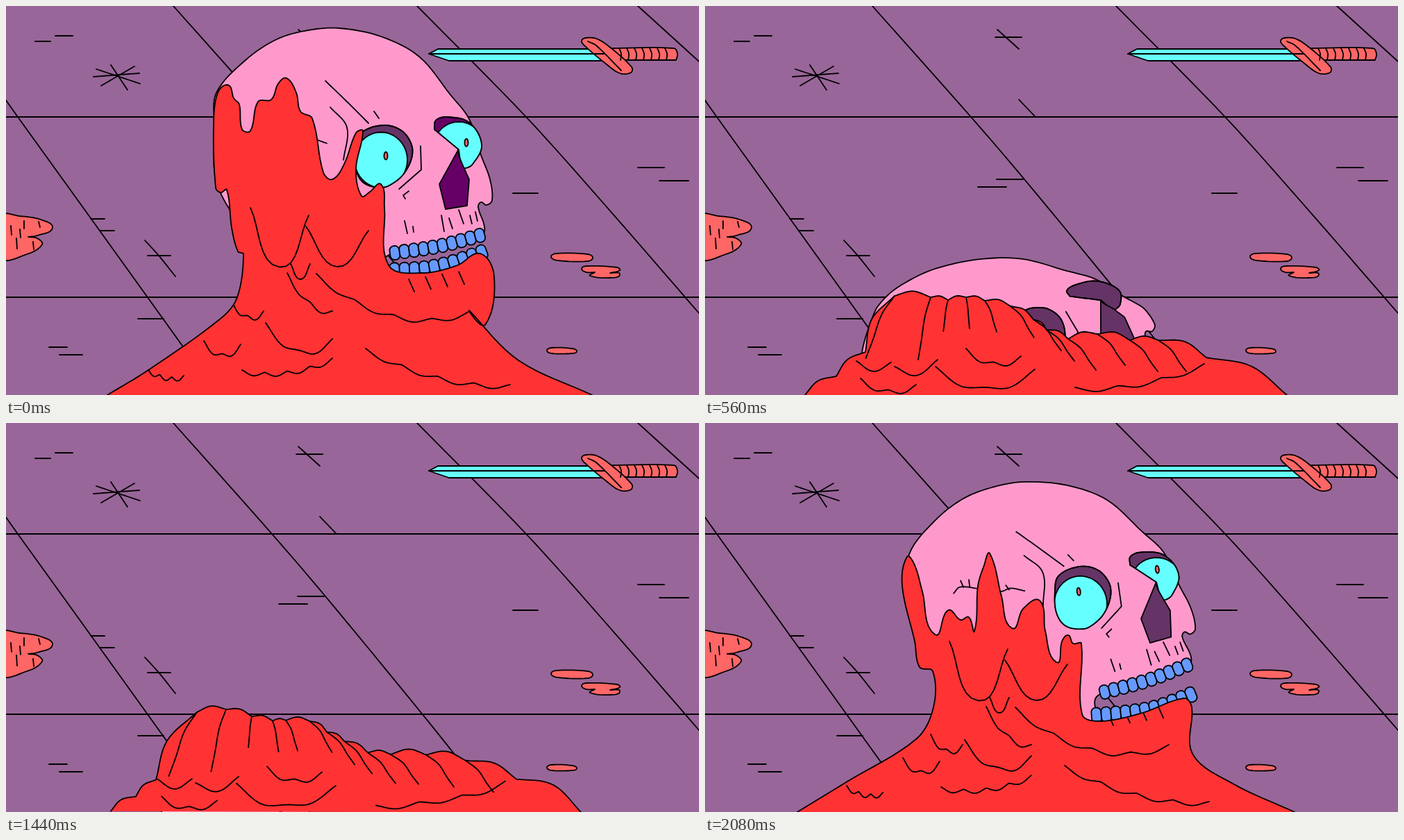
An HTML page with a canvas for the animation above (2.16 s loop, 998x561 px).

```html
<!DOCTYPE html>
<html lang="en">
<head>
<meta charset="utf-8">
<title>Melting skull</title>
<style>
html, body { margin: 0; width: 100%; height: 100%; overflow: hidden; background: #969 }
canvas { display: block; width: 100vw; height: 100vh }
</style>
</head>
<body>
<canvas id="stage" width="998" height="561"></canvas>
<script>
const ctx = document.getElementById('stage').getContext('2d');
const PINK = '#f9c', RED = '#f33', SALMON = '#f66', CYAN = '#6ff', BLUE = '#69f';
const STEP = 80, FRAMES = 27;
const dist = (a, b) => Math.hypot(a[0] - b[0], a[1] - b[1]);
const lerp = (a, b, t) => a.map((v, i) => v + (b[i] - v) * t);
const clamp = (v, lo, hi) => Math.max(lo, Math.min(hi, v));

// "x,y x,y*" becomes points; a star doubles a point to mark a sharp corner.
const points = text => text.trim().split(/\s+/).flatMap(s => {
  const q = s.split(',').map(parseFloat);
  return s.endsWith('*') ? [q, q] : [q];
});

function smooth(p, closed) {
  if (typeof p === 'string') p = points(p);
  const n = p.length, out = [];
  const at = i => closed ? p[(i + n) % n] : p[clamp(i, 0, n - 1)];
  for (let i = 0; i < (closed ? n : n - 1); i++) {
    const [a, b, c, d] = [-1, 0, 1, 2].map(k => at(i + k)), len = dist(b, c);
    if (!len) continue;
    const u = len / (dist(a, c) || 1), v = len / (dist(b, d) || 1);
    for (let k = 0; k < 8; k++) {
      const t = k / 8, w = 1 - t;
      out.push([0, 1].map(j => w * w * (1 + 2 * t) * b[j] + t * t * (3 - 2 * t) * c[j]
        + t * w * w * u * (c[j] - a[j]) - t * t * w * v * (d[j] - b[j])));
    }
  }
  out.push(at(closed ? 0 : n - 1));
  return out;
}
const loop = text => smooth(text, true);
const lines = text => text.split('|').map(s => smooth(s));
const oval = (x, y, rx, ry) => Array.from({ length: 41 }, (_, i) =>
  [x + rx * Math.cos(i * Math.PI / 20), y + ry * Math.sin(i * Math.PI / 20)]);

function resample(pts, n) {
  const sum = [0];
  for (let i = 1; i < pts.length; i++) sum.push(sum[i - 1] + dist(pts[i - 1], pts[i]));
  let j = 1;
  return Array.from({ length: n }, (_, i) => {
    const s = sum.at(-1) * i / (n - 1);
    while (j < pts.length - 1 && sum[j] < s) j++;
    return lerp(pts[j - 1], pts[j], Math.min(1, (s - sum[j - 1]) / (sum[j] - sum[j - 1] || 1)));
  });
}
function mix(a, b, t) {
  if (!t || a === b) return a;
  const q = resample(b, 240);
  return resample(a, 240).map((p, i) => lerp(p, q[i], t));
}

function trace(pts) {
  ctx.beginPath();
  pts.forEach(p => ctx.lineTo(p[0], p[1]));
}
function shape(pts, fill) {
  trace(pts);
  if (fill) { ctx.fillStyle = fill; ctx.fill(); }
  ctx.stroke();
}
function inside(pts, draw) {
  ctx.save(); trace(pts); ctx.clip(); draw(); ctx.restore();
}

// Floor
const floorLines = lines('0,136 17,160 122,306 254,490|241,0 383,160 460,250 598,418 670,508|592,0 749,160 860,284 998,443'
  + '|910,0 998,80|0,160 998,160|0,420 998,420|421,34 452,62|452,135 476,160|200,338 220,360 244,390'
  + '|126,102 192,97|130,91 193,112|137,115 185,87|151,85 175,121');
for (const s of '42,51,22 71,43,25 418,45,38 420,250,38 393,261,41 122,307,20 135,324,21 204,360,33 190,451,37 62,492,26 77,503,33 730,270,36 910,233,38 941,252,42'.split(' ')) {
  const [x, y, w] = s.split(',').map(Number);
  floorLines.push([[x, y], [x + w, y]]);
}
const puddles = ['-9,303 20,303 50,308 67,320 45,331 32,333* 45,335 52,344 30,358 -9,363',
  '785,362 792,357 838,358 845,363 838,368 795,367',
  '829,379 836,375 880,377 884,381 870,385* 884,387 870,392 841,389 848,384* 836,384',
  '779,497 785,493 815,494 822,498 815,501 786,501'].map(loop);
const specks = lines('7,317 8,330|26,310 26,321|47,311 49,319|20,322 21,334|15,335 16,350|39,340 40,351');
const blade = loop('609,69* 622,62* 857,62* 866,79* 638,79*');
const grip = loop('868,61* 962,61 967,69 965,78* 880,78*');
const guard = loop('829,50 835,46 850,47 868,58 901,88 900,96 884,97 866,85 833,57');
const swordLines = lines('609,69 862,69|838,51 850,57 886,93');
for (let x = 885; x < 955; x += 11) swordLines.push(smooth([[x - 2, 61], [x + 1, 69], [x, 78]]));

function drawFloor() {
  ctx.fillStyle = '#969';
  ctx.fillRect(0, 0, 998, 561);
  floorLines.forEach(l => shape(l));
  puddles.forEach(p => shape(p, SALMON));
  specks.forEach(l => shape(l));
  shape(blade, CYAN);
  shape(grip, SALMON);
  shape(guard, SALMON);
  swordLines.forEach(l => shape(l));
}

// Skull, drawn upright once; tilting it back also flattens the cranium.
const EYE = [541, 217];
const skull = loop('301,244 300,170 303,125 345,78 390,48 435,35 480,32 540,44 595,73 640,128 667,163 684,215 697,250 700,280 692,287 684,283 680,290 689,318 686,330 625,347 560,356 545,365 540,400 400,400 320,290');
const marks = lines('460,108 490,137 522,169|530,152 537,162|467,146 491,175 486,222|597,202 598,236* 566,264|580,267 572,273* 575,278'
  + '|574,310 578,328|586,318 587,326|627,302 631,325|638,306 643,321|652,294 659,314|668,302 671,314|676,297 679,310'
  + '|360,190 370,182 395,187 428,195 442,192 462,198|372,173 375,183|384,173 384,184|436,187 440,194');
const sockets = ['504,235 505,205 513,182 545,172 570,180 584,200 584,220 572,243 555,257 540,262 515,255',
  '617,178* 619,165 635,160 667,168 685,200 672,228 660,234 655,230* 652,207*'].map(loop);
const balls = [[540, 222, 38, 40], [652, 203, 36, 36]];
const nose = loop('651,208* 653,218 667,250* 664,288* 633,293* 624,257*');
const upperRow = smooth('553,357 625,346 689,329');
const lowerRow = smooth('538,382 600,379 640,371 692,353');
const skullKeys = [[0, 541, 217, 0], [3, 524, 326, 15], [7, 478, 481, 29], [10, 445, 615, 29],
  [18, 470, 590, 22], [22, 503, 410, 22], [26, 541, 252, 6.5], [27, 541, 217, 0]];

function teeth(row, n, h) {
  const p = resample(row, 2 * n + 1);
  ctx.fillStyle = BLUE;
  for (let i = 0; i < n; i++) {
    const [a, c, b] = p.slice(2 * i, 2 * i + 3), w = dist(a, b);
    ctx.save();
    ctx.translate(c[0], c[1]);
    ctx.rotate(Math.atan2(b[1] - a[1], b[0] - a[0]));
    ctx.beginPath();
    ctx.roundRect(-w / 2, -h / 2, w, h, w * .45);
    ctx.fill(); ctx.stroke();
    ctx.restore();
  }
}

function drawSkull([, x, y, tilt], dark) {
  const turn = tilt * Math.PI / 180, cos = Math.cos(turn), sin = Math.sin(turn);
  const squash = 1 - tilt * .0115, drop = .085 * tilt * tilt;
  const place = pts => pts.map(p => {
    const dx = p[0] - EYE[0], dy = p[1] - EYE[1], v = dy * cos - dx * sin;
    return [x + dx * cos + dy * sin, y + (v < -45 ? -45 + (v + 45) * squash : v)];
  });
  const head = place(skull);
  shape(head, PINK);
  inside(head, () => marks.forEach(l => shape(place(l))));
  sockets.forEach((s, i) => {
    const socket = place(s), [bx, by, rx, ry] = balls[i];
    const ball = place(oval(bx, by + drop, rx, ry));
    shape(socket, i ? dark : '#636');
    inside(socket, () => {
      shape(ball, CYAN);
      const pupil = oval(bx + 7 + 4 * i - tilt * 1.2, by + drop - 6 - tilt * 1.8, 2.5, 5.5);
      inside(ball, () => shape(place(pupil), SALMON));
    });
    shape(socket);
  });
  shape(place(nose), dark);
  const jaw = place(lowerRow).map(([px, py], i, row) => [px, py + tilt * 3 * (.3 + .7 * i / row.length)]);
  teeth(jaw, 11, 22);
  teeth(place(upperRow), 10, 20);
}

// Goo
// A line hanging from one end to the other in n scallops.
function drape([x1, y1, x2, y2, sag, n]) {
  const at = (u, extra) => [x1 + (x2 - x1) * u, y1 + (y2 - y1) * u + sag * 4 * u * (1 - u) + extra];
  const pts = [];
  for (let i = 0; i < n; i++) {
    const knot = at(i / n, 0);
    pts.push(knot, knot, at((i + .5) / n, n > 1 ? 6 : 0));
  }
  return smooth([...pts, [x2, y2]]);
}
const drapes = (list, dy = 0) => list.map(([x1, y1, x2, y2, sag, n]) => drape([x1, y1 + dy, x2, y2 + dy, sag, n]));

const lower = [[285, 483, 338, 488, 16, 2], [340, 525, 470, 508, 10, 4], [204, 523, 256, 533, 6, 3],
  [518, 494, 726, 546, 14, 4], [374, 457, 470, 480, 28, 2]];
const drips = [[352, 291, 436, 302, 80, 1], [432, 318, 522, 324, 55, 1], [410, 372, 438, 372, 22, 1],
  [405, 385, 470, 440, 14, 2], [447, 386, 668, 440, 32, 4], [325, 425, 371, 440, 14, 2]];
for (let x = 580; x < 670; x += 24) drips.push([x, 394 - (x - 580) * .15, x + 8, 412 - (x - 580) * .15, 0, 1]);
const humps = [[293, 462, 378, 411, -24, 1], [312, 480, 402, 440, -45, 1], [410, 415, 463, 450, -10, 1],
  [430, 430, 494, 490, -14, 1], [297, 360, 301, 443, 0, 1], [411, 345, 402, 440, 0, 1],
  [525, 477, 541, 508, -6, 1], [553, 476, 588, 505, -5, 1], [597, 478, 642, 480, 14, 1], [640, 480, 669, 503, -6, 1]];
const skirts = drapes([[218, 512, 268, 514, 14, 1], [273, 520, 335, 510, 18, 1], [376, 494, 455, 505, 14, 2],
  [332, 520, 475, 524, 28, 2], [533, 550, 719, 516, 10, 3], [224, 537, 304, 546, 12, 2]]);

// A heap is a row of lumps: valleys joined by bulges, with a fold running down from each.
function heap(text) {
  const valleys = points(text), outline = [], folds = [...skirts];
  valleys.forEach((a, i) => {
    const b = valleys[i + 1];
    outline.push(a, a);
    if (b) {
      const len = dist(a, b), k = Math.min(.15 * len, 16) / len;
      outline.push([(a[0] + b[0]) / 2 + (b[1] - a[1]) * k, (a[1] + b[1]) / 2 - (b[0] - a[0]) * k]);
    }
    const [x, y] = a;
    if (x > 265 && x < 680) {
      const dx = clamp((x - 365) * .45, -42, 40), dy = x < 330 ? 90 : 45;
      folds.push(smooth([a, [x + dx * .45, y + dy * .3], [x + dx * .75, y + dy * .7], [x + dx, y + dy]]));
    }
  });
  return { outline: smooth(outline), folds };
}
const melt = {
  outline: smooth('146,561 205,525 310,450 333,420 342,358 334,354 325,320 318,265 309,269 302,262 299,170 305,125 320,114 328,133 336,142 340,178 352,180 363,138 382,135 392,112 404,104 418,125 424,152 441,162 457,240 470,250 487,228 504,183 514,180 504,235 512,274 524,268 540,257 545,290 551,374 600,385 650,374 683,357 703,390 690,460 668,440 738,511 844,561'),
  folds: drapes([...drips, ...lower])
};
const slump = {
  outline: smooth('133,561 200,520 298,448 299,410 282,355 297,346 315,370 336,386 347,352 362,352 378,338 388,351 410,340 426,355 458,414 481,386 491,418 505,431 516,400 531,420 550,399 540,462 534,471 525,474* 572,473 620,483 665,481 692,472* 704,473 704,486 750,520 844,561'),
  folds: drapes([...humps, ...lower.map(l => l)], 0)
};
const climb = {
  outline: smooth('133,561 205,517 305,455 329,410 328,358 309,352 302,315 284,235 291,193 302,205 313,243 331,305 350,270 368,284 380,280 388,300 393,235 402,205 410,188 427,250 442,296 458,268 482,256 490,300 506,345 514,315 523,306 530,318 542,318 543,420 570,430 630,418 690,397 701,410 702,477 760,520 849,561'),
  folds: [...drapes(drips, 24), ...drapes(lower)]
};
const sunk = heap('144,561 189,534 231,499 273,418 325,420 350,424 376,420 403,425 440,433 473,452 492,467 523,480 565,473 612,482 653,482 722,507 838,561');
const still = heap('151,561 187,538 216,513 275,418 317,414 354,422 384,428 403,428 437,431 462,447 487,459 521,474 554,477 605,480 662,486 735,514 829,561');
const rising = heap('142,561 180,540 249,482 257,387 270,411 320,421 350,417 385,409 402,419 435,426 490,456 540,484 605,476 655,485 728,508 797,543 838,561');
const gooKeys = [[0, melt], [3, slump], [7, sunk], [11, still], [18, still], [22, rising], [26, climb], [27, melt]];

function drawGoo(a, b, t, f) {
  const sway = pts => f > 7 && f < 22 ? pts.map(([x, y]) => [x, y + 1.5 * Math.sin(x / 25 + f)]) : pts;
  const goo = sway(mix(a.outline, b.outline, t));
  shape(goo, RED);
  inside(goo, () => (t < .5 ? a : b).folds.forEach(l => shape(sway(l))));
}

function drawSparks(age) {
  const size = [.9, 1, .8, .5][age + 1];
  if (!size) return;
  ctx.fillStyle = '#fff';
  [[274, 386, 10, 0], [384, 394, 14, 1], [556, 433, 13, 1], [643, 443, 8, 0]].forEach(([x, y, r, diamond]) => {
    y -= age * 27;
    r *= size;
    trace(diamond ? [[x - r, y], [x - 1, y - r], [x + r, y + 1], [x + 1, y + r]] : oval(x, y, r, r));
    ctx.fill();
  });
}

function span(keys, f) {
  const i = keys.findLastIndex(k => k[0] <= f), a = keys[i], b = keys[i + 1];
  return [a, b, (f - a[0]) / (b[0] - a[0])];
}

function draw(f) {
  ctx.lineWidth = 1.8;
  ctx.lineJoin = ctx.lineCap = 'round';
  ctx.strokeStyle = '#000';
  drawFloor();
  drawSkull(lerp(...span(skullKeys, f)), f ? '#636' : '#606');
  drawSparks(f - 11);
  const [a, b, t] = span(gooKeys, f);
  drawGoo(a[1], b[1], t, f);
}

let shown = -1;
const start = performance.now();
function tick() {
  const f = Math.floor((performance.now() - start) / STEP) % FRAMES;
  if (f !== shown) draw(shown = f);
  requestAnimationFrame(tick);
}
tick();
</script>
</body>
</html>
```
